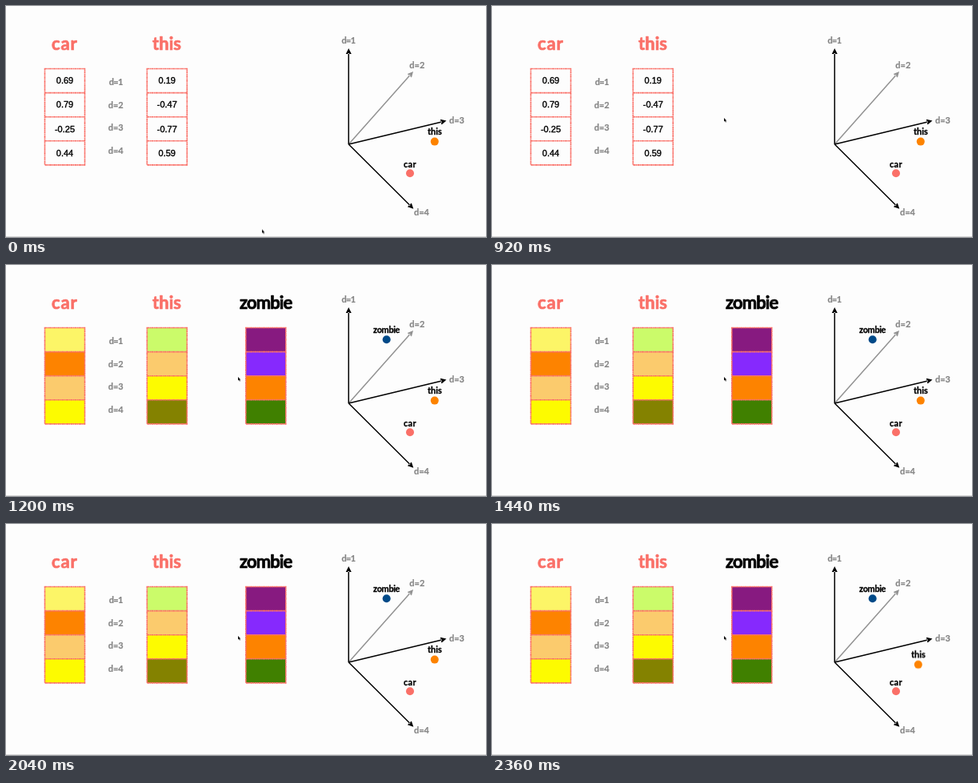
Animation, 600 px wide and 289 px high, one loop 2.4 s. Source, as an HTML page:

```html
<!DOCTYPE html>
<html lang="en">
<head>
<meta charset="utf-8">
<title>Word vectors</title>
<style>
  html, body { margin: 0; width: 100%; height: 100%; overflow: hidden; background: #fdfdfd; }
  svg { display: block; width: 100vw; height: 100vh; }
  text { text-anchor: middle; stroke-linejoin: round; }
  .word { font: 700 11px Lato, sans-serif; stroke: currentColor; stroke-width: .3px; fill: currentColor; }
  .title { font-size: 22px; stroke-width: .7px; }
  .axis { font: 700 11px Lato, sans-serif; fill: #858585; stroke: #858585; stroke-width: .2px; }
  .one { letter-spacing: -.7px; }
  .num { font: 11px "Liberation Sans", Arial, sans-serif; fill: #000; stroke: #000; stroke-width: .4px; }
  .red { color: #fa7068; }
  .grid { fill: none; stroke: #fa7068; stroke-width: 1.6; stroke-dasharray: 3 .4 1.6 .3; }

  .numbers, .colours, .pointer, .mover { animation: 2400ms infinite; }
  .numbers { animation-name: hide; animation-timing-function: step-end; }
  .colours { animation-name: show; animation-timing-function: step-end; }
  .pointer { animation-name: jump; animation-timing-function: step-end; }
  .mover { animation-name: drift; }
  @keyframes hide { 0% { opacity: 1; } 41.6667%, 100% { opacity: 0; } }
  @keyframes show { 0% { opacity: 0; } 41.6667%, 100% { opacity: 1; } }
  @keyframes jump {
    0% { transform: translate(320px, 279.5px); }
    20%, 100% { transform: translate(290px, 140px); }
  }
  @keyframes drift {
    0%, 90% { transform: none; animation-timing-function: cubic-bezier(.33, 0, .67, .33); }
    98.3333%, 100% { transform: translate(-3px, 6.3px); }
  }
</style>
</head>
<body>
<svg id="stage" viewBox="0 0 600 289" preserveAspectRatio="none"></svg>
<script>
const TOP = 78.5, ROW = 30.1, WIDTH = 50;

const text = (cls, x, y, str, spacing = 0) =>
  `<text class="${cls}" x="${x}" y="${y}"${spacing ? ` letter-spacing="${spacing}"` : ''}>${str}</text>`;

const axisLabel = (n, x, y) => text(n === 1 ? 'axis one' : 'axis', x, y, `d=${n}`);

const cells = (x, fills) => fills.map((fill, i) =>
  `<rect x="${x}" y="${TOP + i * ROW}" width="${WIDTH}" height="${ROW}" fill="${fill}"/>`).join('');

const values = (x, list) => list.map((v, i) =>
  text('num', x + WIDTH / 2, 97.3 + i * ROW, v)).join('');

const grid = x => {
  const rules = [1, 2, 3].map(i => `M${x} ${TOP + i * ROW}h${WIDTH}`).join('');
  return `<path class="grid" d="M${x} ${TOP}h${WIDTH}v${4 * ROW}h${-WIDTH}z${rules}"/>`;
};

const arrow = (x, y, color) => {
  const ox = 428.3, oy = 173, len = Math.hypot(x - ox, y - oy);
  const angle = Math.atan2(y - oy, x - ox) * 180 / Math.PI;
  return `<g transform="translate(${ox} ${oy}) rotate(${angle})" fill="${color}">
    <path d="M0 -.75H${len - 6}V.75H0zM${len} 0l-7 -3.5v7z"/></g>`;
};

const point = (name, x, y, color, tx, ty, spacing) =>
  `<circle cx="${x}" cy="${y}" r="5" fill="${color}"/>` + text('word', tx, ty, name, spacing);

const COLS = [48.5, 176.3, 299.8];

document.getElementById('stage').innerHTML = `
  <path d="M0 288.5H600" stroke="#d9d9d9"/>
  <g class="red">
    ${text('word title', 73.3, 54.7, 'car', .8)}
    ${text('word title', 201, 54.7, 'this')}
  </g>
  <g class="numbers">
    ${values(COLS[0], ['0.69', '0.79', '-0.25', '0.44'])}
    ${values(COLS[1], ['0.19', '-0.47', '-0.77', '0.59'])}
  </g>
  <g class="colours">
    ${cells(COLS[0], ['#fcf567', '#fd8300', '#fbcb6d', '#fdfb00'])}
    ${cells(COLS[1], ['#cbfb6a', '#fbcb6d', '#fdfb00', '#848200'])}
    ${cells(COLS[2], ['#871a80', '#8629fd', '#fd8300', '#408000'])}
    ${grid(COLS[2])}
    ${text('word title', 324.6, 54.7, 'zombie', -.9)}
    ${point('zombie', 475.7, 93.2, '#004a88', 475.6, 84.8, -.4)}
  </g>
  ${grid(COLS[0])}${grid(COLS[1])}
  ${[98.5, 127.7, 156.3, 184.7].map((y, i) => axisLabel(i + 1, 137.2, y)).join('')}

  ${arrow(509, 82, '#929292')}
  ${arrow(428.3, 53, '#000')}
  ${arrow(550.5, 143.5, '#000')}
  ${arrow(509.3, 253.8, '#000')}
  ${axisLabel(1, 428, 47.3)}
  ${axisLabel(2, 513.8, 77.7)}
  ${axisLabel(3, 563.4, 146.5)}
  ${axisLabel(4, 519.4, 262.2)}
  ${point('car', 505, 209.3, '#fa7068', 505, 202, .4)}
  <g class="mover">${point('this', 535.8, 169.6, '#fd8300', 536, 161.3)}</g>
  <path class="pointer" d="M0 0V4.6L1.1 3.7L2 5.6L2.9 5.2L2.1 3.4H3.4z" fill="#111"/>`;
</script>
</body>
</html>
```
